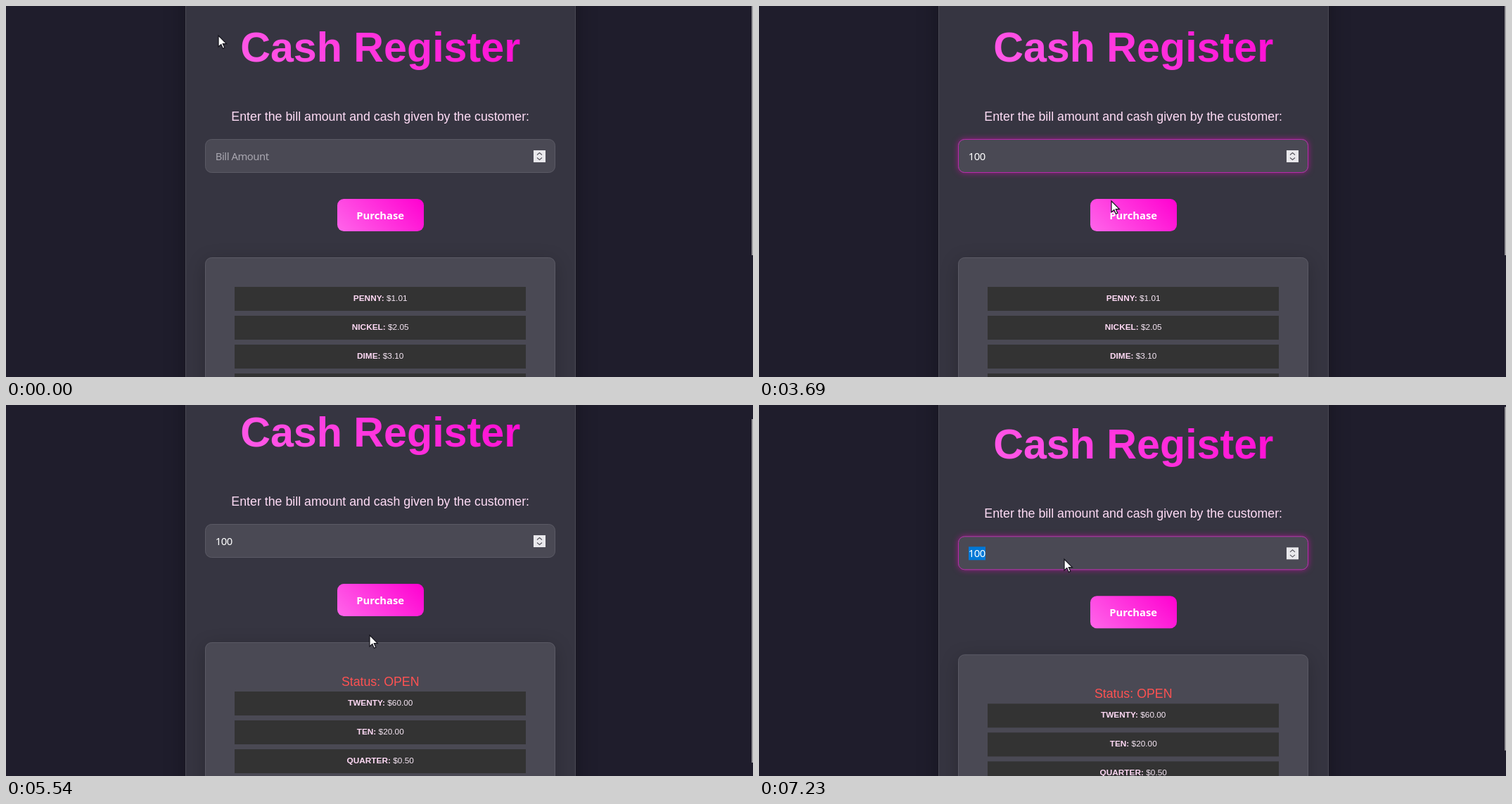
These frames come from a looping animation (1062x527 px, 8000 ms). An HTML page:

```html
<!DOCTYPE html>
<html lang="en">
<head>
<meta charset="utf-8">
<title>Cash Register</title>
<style>
html, body { margin: 0; width: 100%; height: 100%; overflow: hidden; background: #1f1d2c; }
body { position: relative; font-family: "Liberation Sans", Arial, sans-serif; color: #ffdcf6; }
div, svg { position: absolute; box-sizing: border-box; white-space: pre; }
#page { inset: 0; }
#card { left: 254.5px; top: -60px; width: 555px; height: 900px; background: #363541;
  border: 1px solid #4a4954; box-shadow: 0 0 28px rgba(0,0,0,.3); }
.line { left: 283px; width: 498.4px; text-align: center; }
#title { top: 24px; height: 70px; font: bold 59.2px/70px "Liberation Sans", Arial, sans-serif;
  background: linear-gradient(45deg, #ff66ea, #ff00d0); background-clip: text;
  -webkit-background-clip: text; color: transparent; }
#label { top: 144.5px; font-size: 17.77px; line-height: 24px; }
.panel { left: 283px; width: 498.4px; border-radius: 9.25px; background: #4a4954;
  border: 1px solid #5b5a65; }
#field { top: 189px; height: 47.6px; }
#focus { inset: -1px; border-radius: 9.25px; border: 1.2px solid #b62aaa;
  box-shadow: 0 0 8px rgba(255,0,204,.5); }
#value { left: 13.8px; top: 13.6px; height: 19px; color: #fff;
  font: 14.8px/19px "Noto Sans", "Open Sans", sans-serif; letter-spacing: -.45px; }
#value.empty { color: #a9a7b0; }
#value.picked { background: #0078d7; }
#caret { top: 14.5px; width: 1px; height: 17px; background: #fff; }
#spin { left: 466px; top: 14.5px; width: 17px; height: 17px; background: #e9e8ec;
  fill: none; stroke: #55545c; stroke-width: 1.1; }
#button { left: 470.7px; top: 273.5px; width: 123px; height: 46.2px; border-radius: 9.25px;
  background: linear-gradient(45deg, #ff66ea, #ff00d0); color: #fff; text-align: center;
  font: bold 14.8px/46px "Noto Sans", "Open Sans", sans-serif; }
#drawer { top: 356.5px; height: 420px; box-shadow: 0 6px 26px rgba(0,0,0,.22); }
#status { top: 400.5px; font-size: 17.77px; line-height: 24px; color: #ff5252; }
.row { left: 325px; width: 414.4px; height: 33.6px; background: #333; text-align: center;
  font-size: 11.84px; line-height: 33px; color: #f8e8f6; }
.row b { color: #ffd9f5; }
#thumb { left: 1060px; top: 0; width: 2px; background: #99989c; }
#cursor { left: 0; top: 0; overflow: visible; }
</style>
</head>
<body>
<div id="page">
  <div id="card"></div>
  <div id="title" class="line">Cash Register</div>
  <div id="label" class="line">Enter the bill amount and cash given by the customer:</div>
  <div id="field" class="panel">
    <div id="focus"></div>
    <div id="value"></div>
    <div id="caret"></div>
    <svg id="spin" viewBox="0 0 17 17"><path d="M5 6.5 8.5 3.5 12 6.5M5 10.5 8.5 13.5 12 10.5"/></svg>
  </div>
  <div id="drawer" class="panel"></div>
  <div id="before"></div>
  <div id="after"><div id="status" class="line">Status: OPEN</div></div>
  <div id="button">Purchase</div>
</div>
<div id="thumb"></div>
<svg id="cursor" width="14" height="21"><path d="M0 0V16L3.8 12.6 6.4 18.4 8.8 17.3 6.3 11.6H11.4Z"
  fill="#fff" stroke="#15141c" stroke-width="1.2"/></svg>
<script>
const $ = id => document.getElementById(id);
const RATE = 13, LOOP = 8000;

// Tracks: [step, value, ...], linear in between
const cursorTrack = [[1,302,42],[3,308,40],[6,308,40],[15,414,243],[17,416,233],[19,430,217],
  [43,430,217],[48,501,277],[51,527,280],[57,527,280],[60,506,302],[62,506,302],
  [63,511,304],[66,517,327],[80,517,327],[85,434,220],[87,434,219]];
const scrollTrack = [[66,0],[69,19],[72,20],[73,17],[74,10.5],[75,3.4],[76,3.4],[78,2.7]];
const hoverTrack = [[48,0],[52,1],[65,1],[69,0],[81,0],[83,.7],[85,0]];
const focusTrack = [[24,0],[25,.8],[27,1],[51,1],[54,0],[86,0],[87,.6],[91,1]];

function sample(track, n) {
  const i = track.findIndex(k => k[0] > n);
  if (i === 0) return track[0].slice(1);
  if (i < 0) return track[track.length - 1].slice(1);
  const a = track[i - 1], b = track[i], u = (n - a[0]) / (b[0] - a[0]);
  return a.slice(1).map((v, j) => v + (b[j + 1] - v) * u);
}

function addRows(id, top, rows) {
  rows.forEach(([name, sum], i) => $(id).insertAdjacentHTML("beforeend",
    `<div class="row" style="top:${top + i * 41}px"><b>${name}:</b> $${sum}</div>`));
}
addRows("before", 399, [["PENNY", "1.01"], ["NICKEL", "2.05"], ["DIME", "3.10"], ["QUARTER", "4.25"]]);
addRows("after", 427.3, [["TWENTY", "60.00"], ["TEN", "20.00"], ["QUARTER", "0.50"]]);
for (const id of ["before", "after"]) $(id).style.left = $(id).style.top = 0;
$("before").style.width = $("after").style.width = "1062px";

function draw(t) {
  const n = Math.floor((t + 6) * RATE / 1000);
  const [x, y] = sample(cursorTrack, n), [scroll] = sample(scrollTrack, n);
  const [hover] = sample(hoverTrack, n), [focus] = sample(focusTrack, n);
  const paid = n >= 51, typed = "100".slice(0, Math.max(0, n - 35));

  $("cursor").style.transform = `translate(${x}px,${y}px)`;
  $("page").style.transform = `translateY(${-scroll}px)`;
  $("thumb").style.transform = `translateY(${scroll}px)`;
  $("thumb").style.height = (paid ? 488 : 353.5) + "px";
  $("before").style.display = paid ? "none" : "";
  $("after").style.display = paid ? "" : "none";

  $("button").style.transform = `scale(${1 + .05 * hover})`;
  $("button").style.boxShadow = `0 0 18px rgba(255,0,204,${.5 * hover})`;
  $("focus").style.opacity = focus;

  $("value").textContent = typed || "Bill Amount";
  $("value").className = typed ? (n >= 94 ? "picked" : "") : "empty";
  const blink = n >= 25 && n < 30 || n >= 36 && n < 44 || n >= 87 && n < 94;
  $("caret").style.display = blink ? "" : "none";
  $("caret").style.left = 13.8 + typed.length * 8.1 + "px";
}

const start = performance.now();
function loop() {
  draw((performance.now() - start) % LOOP);
  requestAnimationFrame(loop);
}
loop();
</script>
</body>
</html>
```
